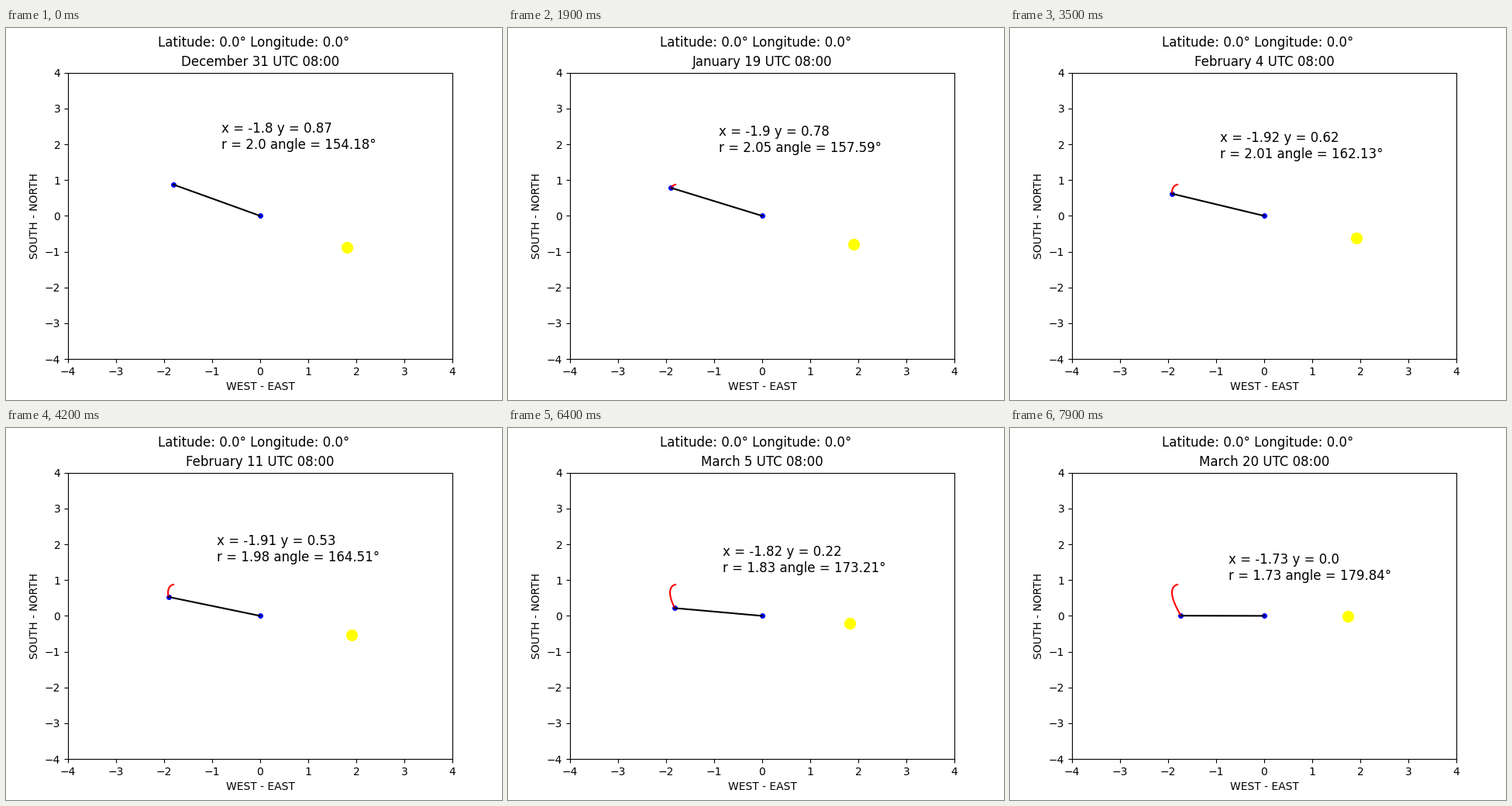
These frames come from a looping animation (640 by 480 pixels, 8 s). A matplotlib script:

```python
import numpy as np
import matplotlib.pyplot as plt
from matplotlib.animation import FuncAnimation

DAYS = 80
UTC_HOUR = 8
TILT = np.radians(23.44)
EQUINOX = 79.35  # day of the year, at the plotted hour


def shadow(day):
    """Tip of a unit pole's shadow at 0N 0E, for a circular orbit."""
    n = day if day else 365
    lon = 2 * np.pi * (n - EQUINOX) / 365.25
    decl = np.arcsin(np.sin(TILT) * np.sin(lon))
    asc = np.arctan2(np.cos(TILT) * np.sin(lon), np.cos(lon))
    eot = (lon - asc + np.pi) % (2 * np.pi) - np.pi
    hour = np.radians(15 * (UTC_HOUR - 12)) + eot
    return np.tan(hour), -np.tan(decl) / np.cos(hour)


def date_name(day):
    if day == 0:
        return "December 31"
    for month, length in (("January", 31), ("February", 28), ("March", 31)):
        if day <= length:
            return f"{month} {day}"
        day -= length


path = np.array([shadow(d) for d in range(DAYS)])

fig, ax = plt.subplots(figsize=(6.4, 4.8), dpi=100)
fig.suptitle("Latitude: 0.0° Longitude: 0.0°")
title = ax.set_title("")
ax.set(xlim=(-4, 4), ylim=(-4, 4), xlabel="WEST - EAST", ylabel="SOUTH - NORTH")

sun, = ax.plot([], [], "o", color="yellow", markersize=10)
ends, = ax.plot([], [], "o", color="blue", markersize=4)
trail, = ax.plot([], [], color="red", lw=1.5)
ray, = ax.plot([], [], color="black", lw=1.5)
label = ax.text(0, 0, "", fontsize=12)


def update(day):
    x, y = path[day]
    r = np.hypot(x, y)
    angle = np.degrees(np.arctan2(y, x))
    title.set_text(f"{date_name(day)} UTC {UTC_HOUR:02d}:00")
    sun.set_data([-x], [-y])
    ends.set_data([0, x], [0, y])
    ray.set_data([0, x], [0, y])
    trail.set_data(*path[:day + 1].T)
    vx, vy, vr, va = (round(float(v), 2) for v in (x, y, r, angle))
    label.set_text(f"x = {vx} y = {vy}\nr = {vr} angle = {va}°")
    label.set_position((x + 1, y + 1))
    return sun, ends, trail, ray, label, title


anim = FuncAnimation(fig, update, frames=DAYS, interval=100,
                     init_func=lambda: update(0), repeat=True, repeat_delay=0)
plt.show()
```
